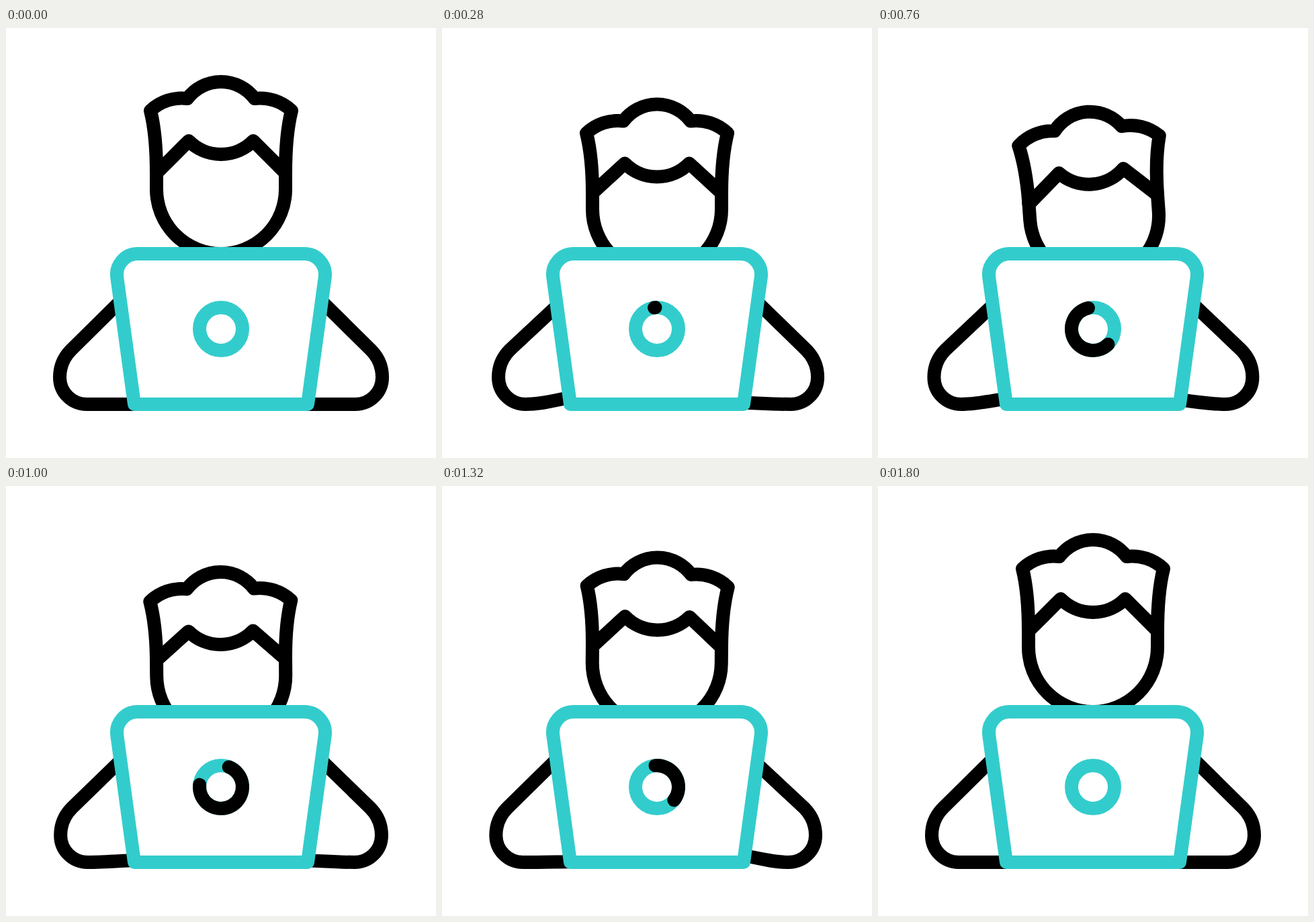
An HTML page for the animation above (2000 ms loop, 640 px wide and 640 px high).

```html
<!DOCTYPE html>
<html lang="en">
<head>
<meta charset="utf-8">
<title>Working at a laptop</title>
<style>
  html, body { margin: 0; width: 100%; height: 100%; overflow: hidden; background: #fff; }
  svg { display: block; width: 100vw; height: 100vh; }
  path, circle { fill: none; stroke: #000; stroke-width: 20; stroke-linecap: round; stroke-linejoin: round; }
  .teal { stroke: #3cc; }
  .screen { fill: #fff; }
</style>
</head>
<body>
<svg viewBox="0 0 640 640">
  <g id="head"><path id="hair"/><path id="face"/></g>
  <path id="left"/>
  <g transform="matrix(-1 0 0 1 640 0)"><path id="right"/></g>
  <path class="teal screen" d="M191 560 L165.3 371.5 A31 31 0 0 1 196 336 H444 A31 31 0 0 1 474.7 371.5 L449 560 Z"/>
  <circle class="teal" cx="320" cy="448" r="32"/>
  <path id="arc"/>
</svg>
<script>
const LOOP = 2000, STEP = 40, END = 1800;
const el = id => document.getElementById(id);
const draw = (id, d) => el(id).setAttribute('d', d);

// [time, value] keys
const DROP = [[40, 0], [160, 21], [280, 33.5], [480, 42], [600, 43], [760, 44.5],
  [1000, 48], [1160, 42], [1320, 26.5], [1480, 11], [1640, 3], [1800, 0]];
const TILT = [[480, 0], [770, -4.1], [1000, -0.5], [1180, 3.5], [1320, 0.5], [1420, 0]];
// Moments at which each hand is at rest
const LEFT = [40, 480, 920, 1360, 1800];
const RIGHT = [215, 640, 1070, 1490, 1800];

const clamp = x => Math.min(1, Math.max(0, x));
const smooth = (t, a, b) => { const x = clamp((t - a) / (b - a)); return x * x * (3 - 2 * x); };

// Monotone cubic through the keys
function curve(keys, t) {
  const last = keys.length - 1;
  if (t <= keys[0][0]) return keys[0][1];
  if (t >= keys[last][0]) return keys[last][1];
  const i = keys.findIndex(k => k[0] > t) - 1;
  const rate = j => (keys[j + 1][1] - keys[j][1]) / (keys[j + 1][0] - keys[j][0]);
  const slope = j => {
    if (j === 0) return rate(0);
    if (j === last) return 0;
    const a = rate(j - 1), b = rate(j);
    return a * b > 0 ? 2 * a * b / (a + b) : 0;
  };
  const [t0, v0] = keys[i], [t1, v1] = keys[i + 1];
  const w = t1 - t0, x = (t - t0) / w, y = 1 - x;
  return v0 * y * y * (1 + 2 * x) + v1 * x * x * (3 - 2 * x)
    + w * x * y * (slope(i) * y - slope(i + 1) * x);
}

function pulse(rests, t) {
  const i = rests.findIndex(r => r > t);
  if (i < 1) return 0;
  const x = (t - rests[i - 1]) / (rests[i] - rests[i - 1]);
  return (1 - Math.cos(2 * Math.PI * x)) / 2;
}

function arm(id, a) {
  const x = 80 + a, end = 560 - 2.5 * a;
  draw(id, `M175 ${402 + 2 * a} L${97 + a} 479 A58 58 0 0 0 ${x} 520
    A40 40 0 0 0 ${x + 40} 560 C${x + 62} 560 ${x + 82} ${560 - 1.3 * a} 190 ${end}`);
}

function head(drop, tilt) {
  const low = 0.885 * drop;
  const up = y => y + drop, dn = y => y + low;
  draw('hair', `M224 ${dn(216)} C224 ${dn(182)} 221 ${up(147)} 215 ${up(123)}
    C230 ${up(109)} 250 ${up(102.5)} 270 ${up(105)}
    A62.5 62.5 0 0 1 370 ${up(105)}
    C390 ${up(102.5)} 410 ${up(109)} 425 ${up(123)}
    C419 ${up(147)} 416 ${up(182)} 416 ${dn(216)}
    L368 ${up(168)} A67.6 67.6 0 0 1 272 ${up(168)} Z`);
  draw('face', `M224 ${dn(214)} V${dn(240)} A96 96 0 0 0 416 ${dn(240)} V${dn(214)}`);
  el('head').setAttribute('transform', `rotate(${tilt} 320 ${207 + drop})`);
}

// Angles run counterclockwise from the top
function spinner(from, to) {
  if (to - from < 0.1) return draw('arc', '');
  const at = deg => {
    const r = (deg + 4.5) * Math.PI / 180;
    return `${320 - 32 * Math.sin(r)} ${448 - 32 * Math.cos(r)}`;
  };
  const mid = (from + to) / 2;
  draw('arc', `M${at(from)} A32 32 0 0 0 ${at(mid)} A32 32 0 0 0 ${at(to)}`);
}

function frame() {
  const now = performance.now() % LOOP;
  const t = Math.min(END, Math.floor(now / STEP) * STEP);
  head(curve(DROP, t), curve(TILT, t));
  arm('left', 4.1 * pulse(LEFT, t));
  arm('right', 4.4 * pulse(RIGHT, t));
  spinner(360 * smooth(t, 660, 1780), 360 * smooth(t, 233, 1150));
  requestAnimationFrame(frame);
}
frame();
</script>
</body>
</html>
```
